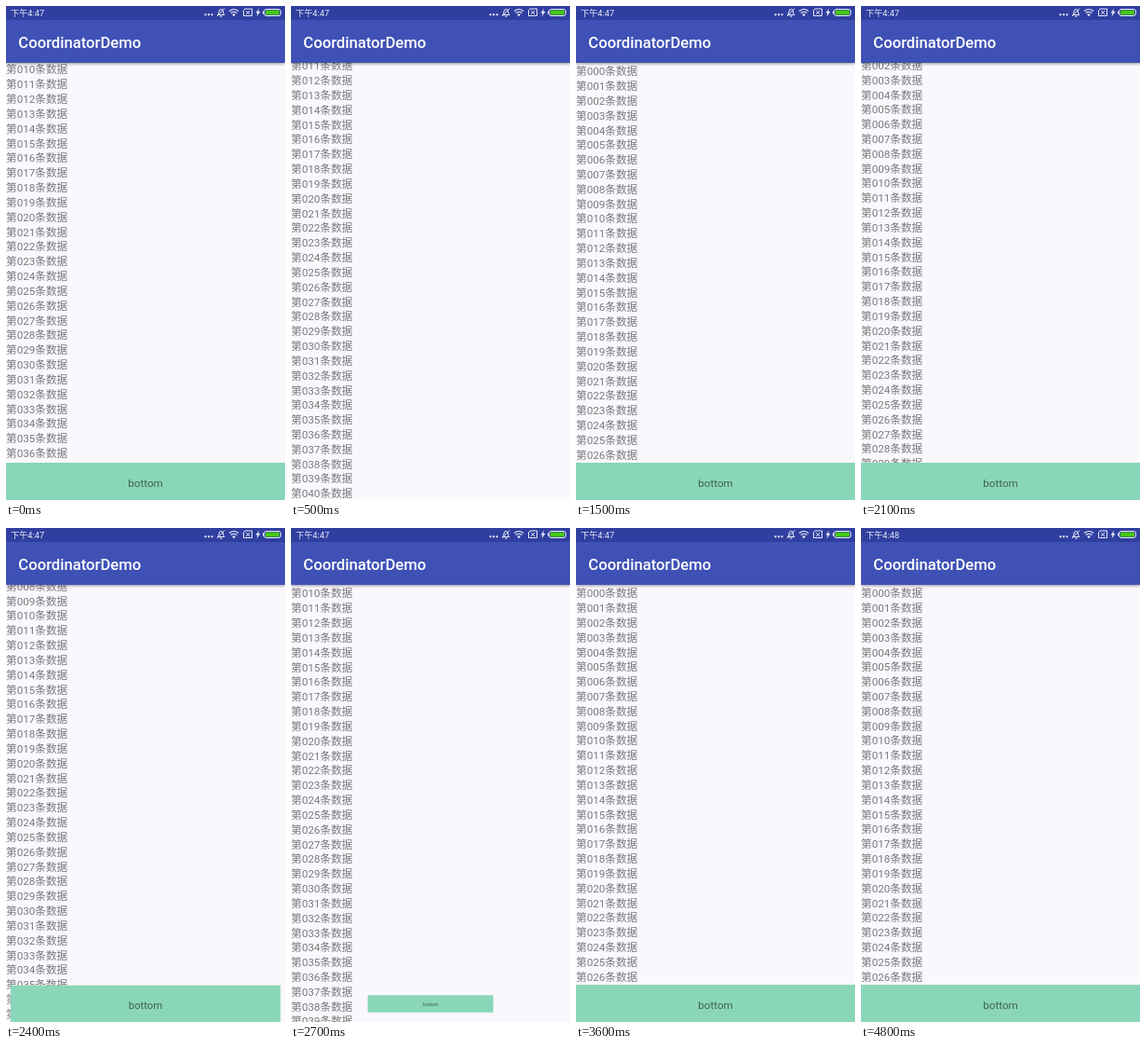
Write an HTML page that moves like this. It is 300x530 px and loops after 5300 ms.

```html
<!DOCTYPE html>
<html lang="zh-CN">
<head>
<meta charset="utf-8">
<style>
  html, body { margin: 0; width: 100%; height: 100%; overflow: hidden; }
  body { font-family: Roboto, "Noto Sans CJK SC", "Noto Sans CJK", sans-serif; }
  #stage { position: relative; width: 300px; height: 530px; overflow: hidden; background: #faf8fc; }
  #stage > * { position: absolute; left: 0; }
  #list { top: 63.2px; font-size: 11.67px; line-height: 15.83px; color: #7b797d; white-space: pre; }
  #bottom { top: 490px; width: 300px; height: 41px; background: #8ad6b8; color: rgba(0, 0, 0, .54);
    font-size: 11.67px; line-height: 44px; text-align: center; }
  #toolbar { top: 15px; width: 300px; height: 46.4px; background: #3f51b5; box-shadow: 0 1px 3px rgba(0, 0, 0, .4);
    color: #fff; font-size: 16.67px; font-weight: 500; line-height: 50px; text-indent: 13.3px; }
  #status { top: 0; width: 300px; height: 15px; background: #303f9f; }
  #stage > #clock { top: 0; left: 5px; color: #e8eaf8; font-size: 9.2px; line-height: 15px; }
  #icons { top: 0; }
</style>
</head>
<body>
<div id="stage">
  <div id="list"></div>
  <div id="bottom">bottom</div>
  <div id="toolbar">CoordinatorDemo</div>
  <div id="status"></div>
  <div id="clock"></div>
  <svg id="icons" width="300" height="15" fill="none" stroke="#e8eaf8">
    <path d="M213.5 9.2h2m1.5 0h2m1.5 0h2" stroke-width="2"/>
    <path d="M227.5 9.5q1.5-1 1.5-3.5q0-2.5 2.2-2.5t2.2 2.5q0 2.5 1.5 3.5zM230 11.2h2.500M227 11L235 2.5"/>
    <path d="M240 5.5q5-4 10 0M241.7 7.5q3.3-2.5 6.6 0M243.4 9.3q1.6-1 3.2 0" stroke-width="1.2"/>
    <path d="M245 9v2" stroke-width="1.5"/>
    <path d="M257 3h7.500v7.500h-9V4.500zM258.2 5l4 4m0-4l-4 4"/>
    <path d="M272 2.500l-3.500 5h2l-1 4 4-5.500h-2.200z" fill="#e8eaf8" stroke="none"/>
    <rect x="277.5" y="3.5" width="18" height="7" rx="2.5"/>
    <rect x="279" y="4.5" width="15" height="5" rx="1" fill="#45c817" stroke="none"/>
    <path d="M276.500 5.500v3"/>
  </svg>
</div>
<script>
const LOOP = 5300, STEP = 100;
const $ = id => document.getElementById(id);

// Each track is a list of [start time, values held for one step each].
const scrollTrack = [
  [0, [160, 164, 170, 175, 178, 179.6]],
  [1000, [80, 0]],
  [2100, [38.5, 74, 107, 134, 150, 158]],
  [3200, [51, 0]]
];
const hide = [1, .968, .91, .793, .45, 0];
const scaleTrack = [
  [0, hide],
  [1100, [.032, .3, .72, .94, 1]],
  [2300, hide],
  [3300, [.1, .5, .88, 1]]
];

function sample(track, time) {
  const [start, values] = track.findLast(([from]) => from <= time);
  return values[Math.min(values.length - 1, Math.floor((time - start) / STEP))];
}

$('list').textContent = Array.from({ length: 60 },
  (_, i) => `第${String(i).padStart(3, '0')}条数据`).join('\n');

function draw(now) {
  const time = now % LOOP;
  $('list').style.transform = `translateY(${-sample(scrollTrack, time)}px)`;
  $('bottom').style.transform = `scale(${sample(scaleTrack, time)})`;
  $('clock').textContent = time < 4800 ? '下午4:47' : '下午4:48';
}

const begin = performance.now();
function tick() {
  draw(performance.now() - begin);
  requestAnimationFrame(tick);
}
tick();
</script>
</body>
</html>
```
